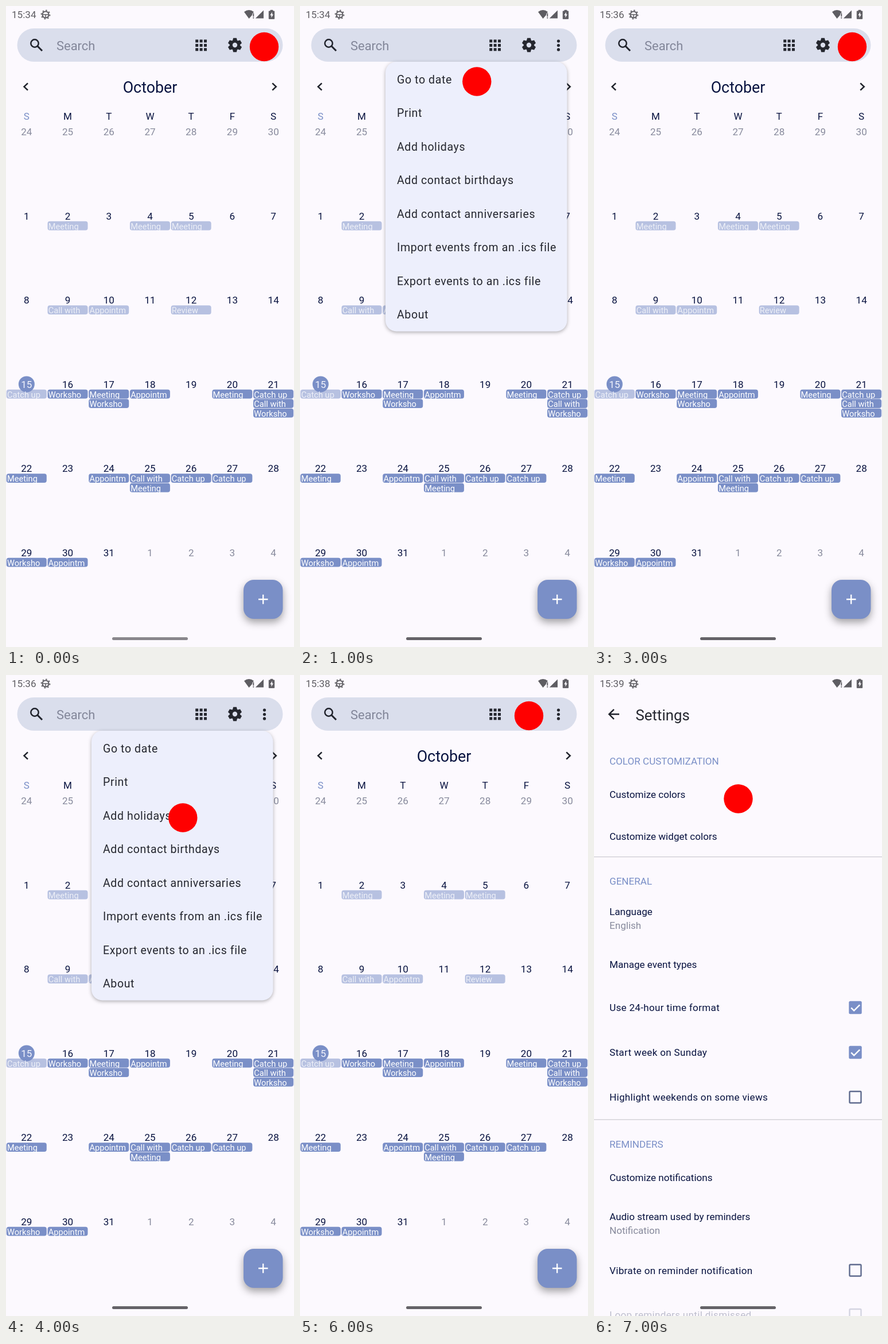
These frames come from a looping animation (502x1116 px, 8000 ms). An HTML page:

```html
<!DOCTYPE html>
<html lang="en">
<head>
<meta charset="utf-8">
<title>Calendar walkthrough</title>
<style>
html, body { margin: 0; width: 100%; height: 100%; overflow: hidden; background: #fcf9fe; }
svg { display: block; width: 100vw; height: 100vh; }
text { font-family: Roboto, sans-serif; font-size: 17.08px; fill: #081340; white-space: pre; }
.mid { text-anchor: middle; }
.spaced { letter-spacing: .305px; }
.accent { fill: #7a8fc7; }
.muted { fill: #878a9c; }
.line { fill: none; stroke: #20232c; stroke-width: 2.5; }
.box { fill: none; stroke: #5f6b8e; stroke-width: 2.4; }
.card { fill: #edeffc; }
.low { filter: drop-shadow(0 2px 3px rgba(0, 0, 0, .3)); }
.high { filter: drop-shadow(0 6px 7px rgba(0, 0, 0, .36)); }
</style>
</head>
<body>
<svg id="stage" viewBox="0 0 502 1116" preserveAspectRatio="none"></svg>
<script>
const ACCENT = '#7a8fc7', INK = '#25272f', COL = 502 / 7;

const text = (x, y, s, cls = '', attrs = '') =>
  `<text x="${x}" y="${y}" class="${cls}" ${attrs}>${s}</text>`;
const rect = (x, y, w, h, r, attrs = '') =>
  `<rect x="${x}" y="${y}" width="${w}" height="${h}" rx="${r}" ${attrs}/>`;
const circle = (x, y, r, attrs = '') => `<circle cx="${x}" cy="${y}" r="${r}" ${attrs}/>`;
const path = (d, attrs = 'class="line"') => `<path d="${d}" ${attrs}/>`;
const group = (id, body) => `<g id="${id}">${body}</g>`;
const times = (n, f) => Array.from({ length: n }, (_, i) => f(i)).join('');

function searchBar() {
  const teeth = times(6, i =>
    path('M-4.2 -7 L-2.9 -12.2 H2.9 L4.2 -7 Z', `fill="${INK}" transform="rotate(${i * 60})"`));
  return rect(19.5, 39, 463, 58, 29, 'fill="#dadeec"') +
    circle(50, 65, 6.7, 'class="line"') + path('M54.8 69.8 L63 78', 'class="line" style="stroke-width:3"') +
    text(88, 77, 'Search', '', 'style="font-size:21.96px;fill:#83879a"') +
    times(9, i => rect(330.2 + i % 3 * 7.4, 58.5 + (i / 3 | 0) * 7.4, 5, 5, .3, `fill="${INK}"`)) +
    `<g transform="translate(399 68)">${teeth}${circle(0, 0, 6.6, `fill="none" stroke="${INK}" stroke-width="4.8"`)}</g>` +
    times(3, i => circle(450.5, 61.1 + i * 7.4, 2.6, `fill="${INK}"`));
}

const EVENTS = {
  2: ['Meeting'], 4: ['Meeting'], 5: ['Meeting'],
  9: ['Call with'], 10: ['Appointm'], 12: ['Review'],
  15: ['Catch up'], 16: ['Worksho'], 17: ['Meeting', 'Worksho'], 18: ['Appointm'],
  20: ['Meeting'], 21: ['Catch up', 'Call with', 'Worksho'],
  22: ['Meeting'], 24: ['Appointm'], 25: ['Call with', 'Meeting'], 26: ['Catch up'], 27: ['Catch up'],
  29: ['Worksho'], 30: ['Appointm']
};

function dayCell(i) {
  const day = i - 6, inMonth = day > 0 && day < 32, today = day === 15;
  const left = i % 7 * COL, cx = left + COL / 2, cy = 219 + (i / 7 | 0) * 146.5;
  const label = day < 1 ? i + 24 : inMonth ? day : day - 31;
  const chips = inMonth && EVENTS[day] || [];
  return (today ? circle(cx, cy, 14, `fill="${ACCENT}"`) : '') +
    text(cx, cy + 6, label, inMonth ? 'mid' : 'mid muted', today ? 'style="fill:#f4f5fd"' : '') +
    chips.map((name, k) => {
      const y = cy + 9.3 + k * 16.5;
      return rect(left + .8, y, 70, 15.8, 4, `fill="${ACCENT}" opacity="${day < 16 ? .52 : 1}"`) +
        text(left + 2, y + 14, name, '', `style="font-size:14.64px;fill:#fff" opacity="${day < 16 ? .75 : 1}"`);
    }).join('');
}

function calendar() {
  return searchBar() +
    path('M38 134.3 L31.5 140.5 L38 146.7') + path('M464.3 134.3 L470.8 140.5 L464.3 146.7') +
    text(251, 151, 'October', 'mid', 'style="font-size:26.84px"') +
    times(7, i => text((i + .5) * COL, 198, 'SMTWTFS'[i], i ? 'mid' : 'mid accent')) +
    times(42, dayCell) +
    rect(414, 999, 68.5, 68, 18, `fill="${ACCENT}" class="high"`) +
    path('M440 1033 H456.5 M448.2 1024.8 V1041.2', 'fill="none" stroke="#fff" stroke-width="2.3"');
}

function menu() {
  const items = ['Go to date', 'Print', 'Add holidays', 'Add contact birthdays', 'Add contact anniversaries',
    'Import events from an .ics file', 'Export events to an .ics file', 'About'];
  return rect(149, 97, 316.5, 469.5, 19, 'class="card low"') +
    items.map((s, i) => text(169, 134.5 + i * 58.57, s, '',
      'style="font-size:19.53px;letter-spacing:.61px;fill:#25272f"')).join('');
}

function picker() {
  const column = (cx, values) => values.map((s, i) =>
    text(cx, 445 + i * 73.3, s, 'mid', `style="fill:${i === 1 ? '#1b1d2a' : '#9b9dab'}"`)).join('') +
    [480.5, 541.5].map(y => path(`M${cx - 39} ${y} h78`, 'stroke="#555866" stroke-width="2.4"')).join('');
  return rect(42.5, 382, 417.5, 352, 34, 'class="card high"') +
    column(197, ['Sep', 'Oct', 'Nov']) + column(294.7, ['2022', '2023', '2024']) +
    text(274.5, 694, 'Cancel', '', 'style="font-weight:500;letter-spacing:.12px;fill:#7b88b0"');
}

function countries() {
  const names = ['Algeria', 'Argentina', 'Australia', 'België', 'Bolivia', 'Brasil', 'България', 'Canada',
    'China', 'Colombia', 'Česká republika', 'Danmark', 'Deutschland', 'Eesti', 'España', 'Éire'];
  const rows = names.map((s, i) => {
    const y = 169 + i * 53.93;
    return circle(81.2, y, 11.2, 'class="box"') + text(100.8, y + 6.2, s, 'spaced');
  }).join('');
  return `<clipPath id="sheet">${rect(42.5, 127, 417.5, 862, 34)}</clipPath>` +
    rect(42.5, 127, 417.5, 862, 34, 'class="card high"') +
    `<g clip-path="url(#sheet)">${rows}${rect(454.8, 127, 6, 214, 0, 'fill="#c9cbd9"')}</g>`;
}

function settings() {
  const row = (y, s, cls = '') => text(27, y + 6, s, cls);
  const check = (y, s, on) => row(y, s, 'spaced') + (on
    ? rect(444.3, y - 11.2, 22.4, 22.4, 2.5, `fill="${ACCENT}"`) +
      path(`M448.2 ${y + .3} l5 5 l10 -10`, 'fill="none" stroke="#fff" stroke-width="2.4"')
    : rect(445.5, y - 10, 20, 20, 1.5, 'class="box"'));
  const divider = y => rect(0, y, 502, 1.2, 0, 'fill="#cbc9d0"');
  return rect(0, 0, 502, 1116, 0, 'fill="#fcf9fe"') +
    path('M44 68.3 H26.5 M34.8 59.8 L26.3 68.3 L34.8 76.8') +
    text(72.5, 78.5, 'Settings', '', 'style="font-size:25.8px;fill:#25272f"') +
    row(149.5, 'COLOR CUSTOMIZATION', 'accent') +
    row(207.5, 'Customize colors') + row(280.5, 'Customize widget colors') + divider(316) +
    row(359, 'GENERAL', 'accent') +
    row(412, 'Language') + row(436, 'English', 'muted') + row(504, 'Manage event types') +
    check(579, 'Use 24-hour time format', true) + check(657, 'Start week on Sunday', true) +
    check(735, 'Highlight weekends on some views', false) + divider(773.5) +
    row(817, 'REMINDERS', 'accent') +
    row(875, 'Customize notifications') +
    row(943, 'Audio stream used by reminders') + row(967, 'Notification', 'muted') +
    check(1036.5, 'Vibrate on reminder notification', false) +
    `<g opacity=".25">${check(1114, 'Loop reminders until dismissed', false)}</g>`;
}

function statusBar() {
  return text(10, 21, '', '', 'id="clock" style="fill:currentColor"') +
    `<g fill="none" stroke="currentColor">
      ${circle(69, 15, 5.6, 'stroke-width="2"')}
      ${circle(69, 15, 7.5, 'stroke-width="1.8" stroke-dasharray="2.4 3.49"')}
      ${path('M63 15 H75 M69 15 V20', 'stroke-width="1.5"')}
    </g>
    <g fill="currentColor">
      ${path('M415 10.2 Q423.5 4 432 10.2 L429.3 13.5 V15.5 L423.5 22 Z', '')}
      ${rect(430.4, 12.5, 1.8, 6, 0)}${rect(430.4, 19.7, 1.8, 1.9, 0)}
      ${path('M449 7.5 V21.5 H434.8 Z', 'id="signal"')}
      ${path('M458.3 9 H461 V7.3 H465 V9 H467.7 V22.3 H458.3 Z', 'stroke="currentColor" stroke-linejoin="round"')}
    </g>` +
    path('M464 10.5 L460.3 16.2 H462.5 V20.5 L466 14.6 H464 Z', 'id="bolt"');
}

const stage = document.getElementById('stage');
stage.innerHTML =
  rect(0, 0, 502, 1116, 0, 'fill="#fcf9fe"') +
  group('calendar', calendar()) + group('settings', settings()) +
  rect(185, 1099, 132, 5, 2.5, 'id="handle"') +
  rect(0, 0, 502, 1116, 0, 'id="shade" opacity=".325"') +
  group('menu', menu()) + group('picker', picker()) + group('countries', countries()) +
  group('status', statusBar()) +
  circle(0, 0, 25.2, 'id="tap" fill="#f00"');

const part = id => document.getElementById(id);
const show = (id, on) => part(id).setAttribute('display', on ? 'inline' : 'none');

// One second each: clock, tap position, open overlay or page.
const STEPS = [
  ['15:34', 450, 71, ''],
  ['15:34', 308.3, 131.5, 'menu'],
  ['15:35', 390, 700, 'picker'],
  ['15:36', 450, 71, ''],
  ['15:36', 308.3, 248.5, 'menu'],
  ['15:37', 33.5, 142.5, 'countries'],
  ['15:38', 399, 71, ''],
  ['15:39', 251.5, 215.5, 'settings']
];
let current = -1;

function render(ms) {
  const n = Math.floor(ms / 1000) % STEPS.length;
  if (n === current) return;
  current = n;
  const [clock, x, y, view] = STEPS[n];
  const dim = view === 'picker' || view === 'countries';
  for (const id of ['menu', 'picker', 'countries', 'settings']) show(id, id === view);
  show('calendar', view !== 'settings');
  show('shade', dim);
  part('clock').textContent = clock;
  part('status').style.color = dim ? '#fff' : '#5e5d62';
  part('bolt').setAttribute('fill', dim ? '#99989b' : '#fcf9fe');
  part('signal').setAttribute('style', dim ? 'fill:none;stroke:#fff;stroke-width:1.5' : '');
  part('handle').setAttribute('fill', n ? '#656368' : '#89878c');
  part('tap').setAttribute('transform', `translate(${x} ${y})`);
}

const start = performance.now();
function tick() {
  render(performance.now() - start);
  requestAnimationFrame(tick);
}
tick();
</script>
</body>
</html>
```
